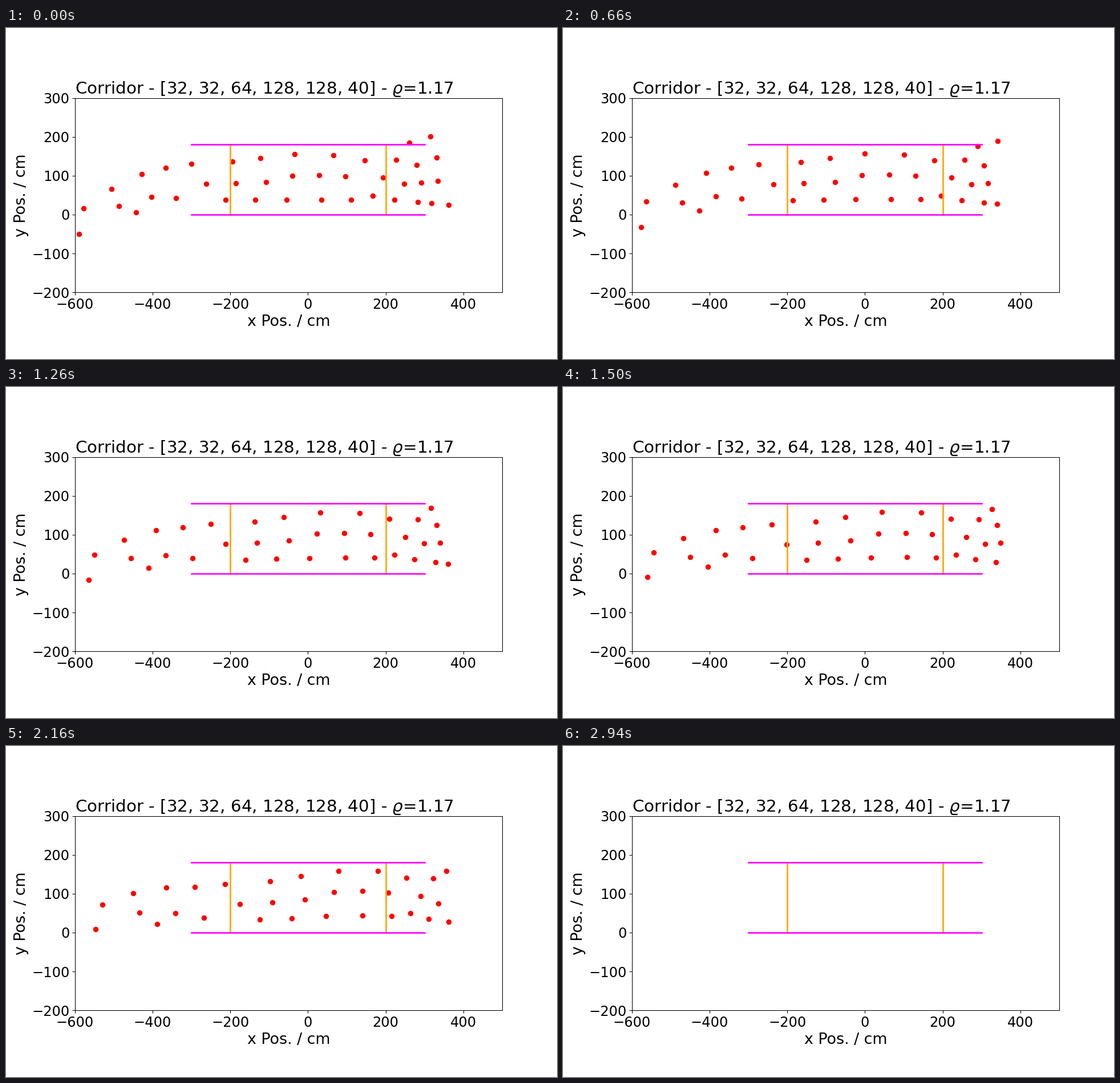
A matplotlib script for the animation above (3 s loop, 966 by 580 pixels).

```python
import numpy as np
import matplotlib.pyplot as plt
from matplotlib.animation import FuncAnimation

W, H, DPI = 966, 580, 100
FRAMES, STEP = 50, 60
LAST = (FRAMES - 1) * STEP
S = 0.966                           # scale of type, lines and paddings
UNIT, OX, OY = 0.681, 529.5, 326.9  # pixels per cm and the pixel of (0, 0)


def lane(xs, *keys):
    """Walkers at xs, lined up along a bent line through the key points."""
    kx, ky = zip(*keys)
    return np.column_stack([xs, np.interp(xs, kx, ky)])


# Starting places in stage pixels: three lanes and a few stragglers
upper = lane([136, 185, 238, 280, 325, 397, 446, 506, 574, 629, 684, 755],
             (136, 316), (185, 282), (238, 256), (300, 239), (397, 234),
             (506, 221), (574, 223), (635, 233), (755, 227))
middle = lane([351, 403, 456, 502, 549, 595, 661, 698, 728, 757],
              (350, 273), (455, 270), (510, 257), (660, 262), (698, 273),
              (757, 268))
lower = lane([198, 255, 298, 385, 437, 492, 553, 605, 643, 681, 722, 746, 776],
             (198, 312), (255, 296), (385, 301), (605, 301), (643, 294),
             (681, 301), (776, 310))
loose = [(128, 361), (228, 323), (707, 201), (720, 240), (744, 190)]
X, Y = np.vstack([upper, middle, lower, loose]).T

# Distance covered in RUN ms: fastest mid-corridor, a little faster at the top
RUN = 2640
DX = np.interp(X, [120, 240, 340, 530, 600, 780], [42, 50, 70, 90, 89, 58])
DX += 0.1 * (285 - Y)

# Gentle weave, plus a pull into the corridor at the entry and above the wall
DY = 5 * np.cos(2 * np.pi * (X - 340) / 420)
DY -= 0.31 * np.maximum(0, 270 - X)
DY += 0.9 * np.maximum(0, 222 - Y)


def positions(t):
    """Walkers still on stage at time t, in cm."""
    x, y = X + DX * t / RUN, Y + DY * t / RUN
    gate = min(779, 765 + 0.0105 * t)
    on = ((x < gate) | (t == 0)) & (t < LAST)
    return (x[on] - OX) / UNIT, (OY - y[on]) / UNIT


fig, ax = plt.subplots(figsize=(W / DPI, H / DPI), dpi=DPI)
fig.subplots_adjust(left=0.1251, right=0.9006)
ax.set_aspect("equal")
ax.set(xlim=(-600, 500), ylim=(-200, 300),
       xticks=range(-600, 500, 200), yticks=range(-200, 301, 100))
ax.tick_params(labelsize=18 * S, length=3.5 * S, width=0.8 * S, pad=3.5 * S)
ax.set_xlabel("x Pos. / cm", fontsize=20 * S, labelpad=4 * S)
ax.set_ylabel("y Pos. / cm", fontsize=20 * S, labelpad=4 * S)
ax.set_title(r"Corridor - [32, 32, 64, 128, 128, 40] - $\varrho$=1.17",
             loc="left", fontsize=21.2, pad=6 * S)
for spine in ax.spines.values():
    spine.set_linewidth(0.8 * S)

dots, = ax.plot([], [], "o", color="red", markersize=6 * S)
for x in (-200, 200):
    ax.plot([x, x], [0, 180], color="orange", lw=2 * S)
for y in (0, 180):
    ax.plot([-300, 300], [y, y], color="magenta", lw=2 * S)


def draw(i):
    dots.set_data(*positions(i * STEP))
    return dots,


anim = FuncAnimation(fig, draw, frames=FRAMES, init_func=lambda: draw(0),
                     interval=STEP, repeat=True, repeat_delay=0)
plt.show()
```
